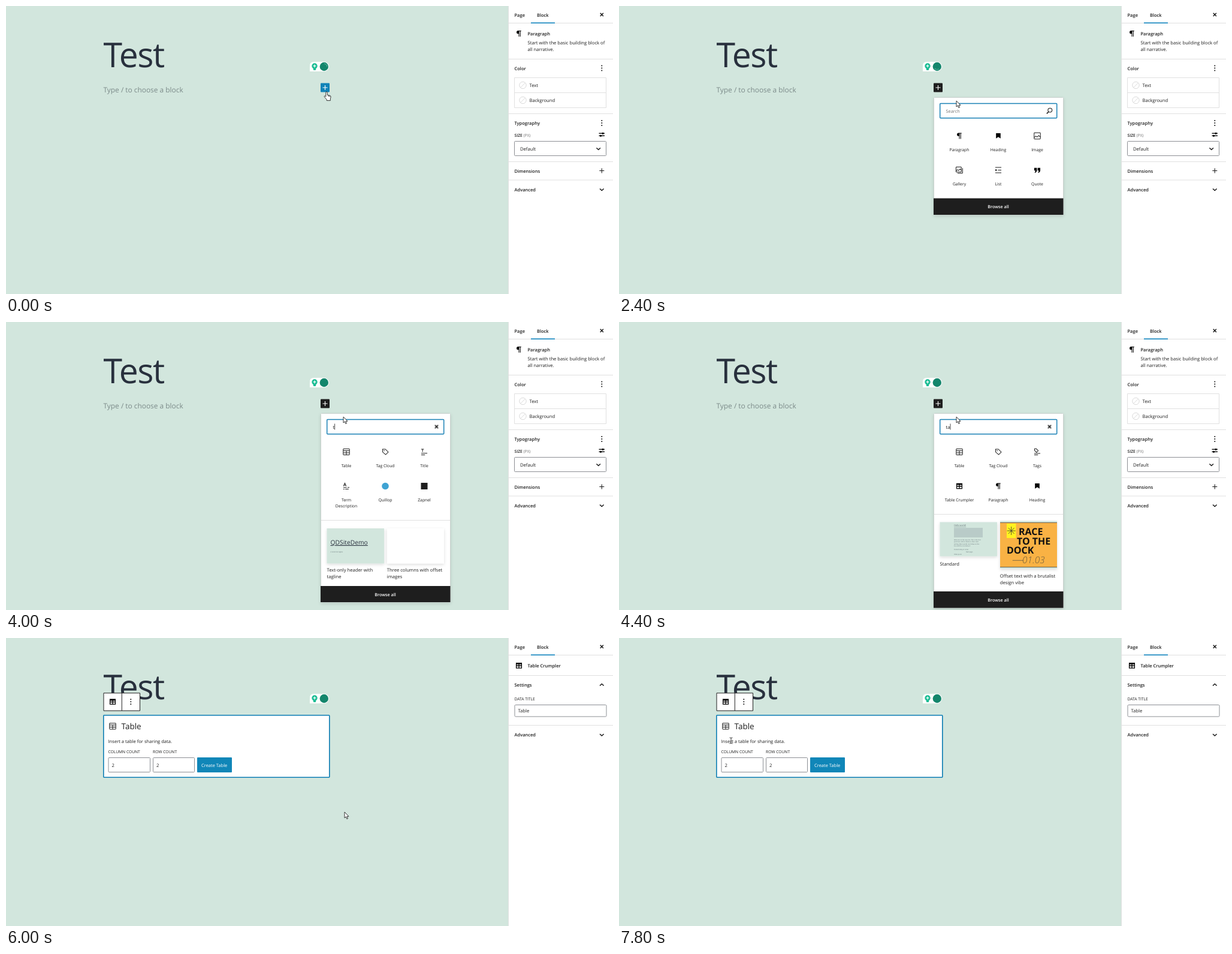
These frames come from a looping animation (1013x480 px, 8 s). An HTML page:

```html
<!DOCTYPE html>
<html lang="en">
<head>
<meta charset="utf-8">
<title>Block editor</title>
<style>
html, body { margin: 0; width: 100%; height: 100%; overflow: hidden; background: #d2e6dd; }
svg { display: block; width: 100%; height: 100%; }
text { font: 7.65px "Open Sans", "Noto Sans", sans-serif; fill: #1e1e1e; text-rendering: geometricPrecision; white-space: pre; }
.b { font-weight: 600; font-size: 7.5px; }
.cap { font-size: 6.7px; }
.lab text { font-size: 6.8px; text-anchor: middle; }
.cta { font-weight: 600; font-size: 7.2px; fill: #fff; text-anchor: middle; }
.soft { fill: #757575; }
.tiny text { font-size: 2.4px; fill: #56636a; }
.poster text { font-weight: 700; font-size: 16px; fill: #111; }
.ln { fill: none; stroke: #1e1e1e; stroke-width: 1.6; }
.rule { fill: none; stroke: #e0e0e0; }
.field { fill: #fff; stroke: #8c8f94; }

/* Hard cuts on an 8 s loop */
.a { animation: 8s step-end infinite; }
.base { animation-name: base; }
.card, .typed, .pop, .s0, .s1, .s2, .hot, .caret0, .caret2, .arrow, .beam { opacity: 0; }
.card { animation-name: card; }
.pop { animation-name: pop; }
.s0 { animation-name: s0; }
.s1 { animation-name: s1; }
.s2 { animation-name: s2; }
.typed { animation-name: typed; }
.hot { animation-name: hot; }
.tint { animation-name: tint; }
.caret0 { animation-name: caret0; }
.caret2 { animation-name: caret2; }
.add { animation-name: add; transform-origin: 532.5px 136px; }
.addbg { animation-name: addbg; }
.busy { animation-name: busy; }
.spin { transform-origin: 530.8px 101px; animation: spin 1s steps(5) infinite; }
.pointer { animation-name: move; }
.hand { animation-name: hand; }
.arrow { animation-name: arrow; }
.beam { animation-name: beam; }

@keyframes base { 0% { opacity: 1 } 75%, 100% { opacity: 0 } }
@keyframes card { 0% { opacity: 0 } 75%, 100% { opacity: 1 } }
@keyframes pop { 0% { opacity: 0 } 22.5% { opacity: 1 } 75%, 100% { opacity: 0 } }
@keyframes s0 { 0% { opacity: 0 } 22.5% { opacity: 1 } 47.5%, 100% { opacity: 0 } }
@keyframes s1 { 0% { opacity: 0 } 47.5% { opacity: 1 } 55%, 100% { opacity: 0 } }
@keyframes s2 { 0% { opacity: 0 } 55% { opacity: 1 } 75%, 100% { opacity: 0 } }
@keyframes typed { 0% { opacity: 0 } 47.5%, 100% { opacity: 1 } }
@keyframes hot { 0% { opacity: 0 } 67.5%, 100% { opacity: 1 } }
@keyframes tint { 0% { fill: #1e1e1e } 67.5%, 100% { fill: #007cba } }
@keyframes caret0 { 0%, 27.5%, 37.5% { opacity: 0 } 22.5%, 32.5%, 42.5% { opacity: 1 } 47.5%, 100% { opacity: 0 } }
@keyframes caret2 { 0% { opacity: 0 } 55% { opacity: 1 } 60%, 100% { opacity: 0 } }
@keyframes add { 0% { transform: scale(1) } 2.5% { transform: scale(1.18) } 25%, 100% { transform: scale(1) } }
@keyframes addbg { 0% { fill: #1083b8 } 25%, 100% { fill: #1e1e1e } }
@keyframes busy { 0% { opacity: 1 } 47.5%, 100% { opacity: 0 } }
@keyframes spin { to { transform: rotate(360deg) } }
@keyframes hand { 0% { opacity: 1 } 25% { opacity: 0 } 65% { opacity: 1 } 75%, 100% { opacity: 0 } }
@keyframes arrow { 0% { opacity: 0 } 25% { opacity: 1 } 65% { opacity: 0 } 75% { opacity: 1 } 87.5%, 100% { opacity: 0 } }
@keyframes beam { 0% { opacity: 0 } 87.5%, 100% { opacity: 1 } }
@keyframes move {
  0% { transform: translate(535px, 143px) }
  2.5% { transform: translate(534px, 142px) }
  5% { transform: translate(531px, 140px) }
  25% { transform: translate(545px, 149px) }
  27.5% { transform: translate(563px, 158px) }
  62.5% { transform: translate(564px, 200px) }
  65% { transform: translate(565px, 256px) }
  67.5% { transform: translate(565px, 290px) }
  80% { transform: translate(352px, 257px) }
  82.5% { transform: translate(318px, 244px) }
  85% { transform: translate(280px, 226px) }
  87.5% { transform: translate(243px, 206px) }
  90% { transform: translate(208px, 188px) }
  92.5% { transform: translate(183px, 173px) }
  95% { transform: translate(185px, 172px) }
  97.5%, 100% { transform: translate(187px, 171px) }
}
</style>
</head>
<body>
<svg viewBox="0 0 1013 480">
<defs>
  <!-- Icons: 24-unit grid, centred on their origin -->
  <g id="para" transform="scale(.63) translate(-12 -12)"><path d="M10 4a4 4 0 0 0 0 8.5h1.2V20h1.6V5.6h2V20h1.6V5.6H18V4z"/></g>
  <g id="mark" transform="scale(.63) translate(-12 -12)"><path d="M6 5v13.8l6-4 6 4V5z"/></g>
  <g id="pic" transform="scale(.63) translate(-12 -12)" class="ln"><rect x="3.7" y="3.7" width="16.6" height="16.6" rx="1.5"/><path d="M4 16l4-3.5 3.5 2.5L16 11l4 4"/></g>
  <g id="gal" transform="scale(.63) translate(-12 -12)" class="ln"><rect x="3.2" y="3.7" width="14" height="13.6" rx="1.5"/><path d="M3.5 14l3.5-3 3 2 4-4 3 3M20.5 7v12q0 1.5-1.5 1.5H7"/></g>
  <g id="list" transform="scale(.63) translate(-12 -12)"><path class="ln" d="M4 4.8h16M11 12h9M4 19.2h16"/><circle cx="6" cy="12" r="2"/></g>
  <g id="quote" transform="scale(.63) translate(-12 -12)"><path id="q" d="M4 6h7v7q0 4-4 6H5q2-3 2-6H4z"/><use href="#q" x="9"/></g>
  <g id="table" transform="scale(.63) translate(-12 -12)" class="ln"><rect x="3.7" y="4.2" width="16.6" height="15.6" rx="1.3"/><path d="M4 9h16M4 14.4h16M12 9v11"/></g>
  <g id="grid" transform="scale(.63) translate(-12 -12)"><path fill-rule="evenodd" d="M4 4.5h16v15H4zM6 9v2.4h5V9zM13 9v2.4h5V9zM6 13.4v4h5v-4zM13 13.4v4h5v-4z"/></g>
  <g id="tag" transform="scale(.63) translate(-12 -12)"><path class="ln" d="M4.8 4.8h7.4l7.6 7.6-6.8 7L4.8 12z"/><circle cx="8.8" cy="8.8" r="1.2"/></g>
  <g id="lead" transform="scale(.63) translate(-12 -12)"><path class="ln" d="M4 5h7M7.5 5v7M4 15.6h16M4 20h10" stroke-width="2"/></g>
  <g id="term" transform="scale(.63) translate(-12 -12)"><path class="ln" d="M4.5 12L8 4l3.5 8M5.8 9.6h4.4M4 15.6h9M15 15.6h5M4 20h3M9 20h9"/></g>
  <g id="tags" transform="scale(.63) translate(-12 -12)"><path class="ln" d="M5 3.8h4.6l5 5-4.3 4.4L5 8.4zM4 16h16M4 20h10"/></g>
  <g id="dots"><circle cy="-4" r=".95"/><circle r=".95"/><circle cy="4" r=".95"/></g>
  <path id="down" class="ln" d="M-3.3-1.5L0 1.5 3.3-1.5" stroke-width="1.1"/>
  <path id="up" class="ln" d="M-3.3 1.5L0-1.5 3.3 1.5" stroke-width="1.1"/>
  <path id="cross" class="ln" d="M-2.6-2.6L2.6 2.6M2.6-2.6L-2.6 2.6" stroke-width="1.1"/>
  <path id="plus" d="M-4 0H4M0-4V4"/>
  <g id="swatch" fill="none" stroke="#d8d8d8"><circle r="5.7"/><path d="M-4 4L4-4"/></g>
  <filter id="lift" x="-10%" y="-10%" width="120%" height="130%"><feDropShadow dx="0" dy="2" stdDeviation="2.5" flood-opacity=".13"/></filter>
</defs>

<rect width="1013" height="480" fill="#d2e6dd"/>
<text x="162.5" y="102" style="font-size:57px;letter-spacing:-1.4px;fill:#28303d">Test</text>

<!-- Writing helper -->
<path d="M507 109V100q0-7 7-7h17a8 8 0 0 1 0 16z" fill="#fff"/>
<g fill="#1bbd94"><circle cx="515" cy="100" r="4.7"/><rect x="512.8" y="103.5" width="4.4" height="3.6" rx="1"/></g>
<path d="M515 97.5v5M512.7 99.8h4.6" stroke="#fff" stroke-width="1.2"/>
<circle cx="530.8" cy="101" r="7.2" fill="#14866c"/>
<g class="a busy"><path class="spin" d="M530.8 96a5 5 0 0 1 5 5" fill="none" stroke="#6fc7ae" stroke-width=".9"/></g>

<!-- Sidebar -->
<rect x="838" width="175" height="480" fill="#fff"/>
<path class="rule" d="M838.5 0V480M838 28.5H1013"/>
<path d="M876 28.2h40" stroke="#007cba" stroke-width="1.6"/>
<text class="b" x="848.5" y="18">Page</text>
<text class="b" x="886" y="18">Block</text>
<use href="#cross" x="994.3" y="14.4"/>

<g class="a base">
  <text x="162.5" y="144" style="font-size:11.9px;fill:#7b8a89">Type / to choose a block</text>
  <g class="a add">
    <rect class="a addbg" x="525" y="128.5" width="15" height="15" rx="1"/>
    <use href="#plus" x="532.5" y="136" stroke="#fff" stroke-width="1.1"/>
  </g>

  <use href="#para" x="856" y="46"/>
  <text class="b" x="870.5" y="48.6">Paragraph</text>
  <text x="870.5" y="64.4">Start with the basic building block of</text>
  <text x="870.5" y="75.4">all narrative.</text>
  <path class="rule" d="M839 88.5h174M839 179.5h174M839 259.5h174M839 290h174M848.5 119.5h153v50h-153zM848.5 144.5h153"/>
  <text class="b" x="848.5" y="106.8">Color</text>
  <use href="#dots" x="994.3" y="103.5"/>
  <use href="#swatch" x="862.5" y="132"/>
  <text x="873.5" y="135">Text</text>
  <use href="#swatch" x="862.5" y="157"/>
  <text x="873.5" y="160">Background</text>
  <text class="b" x="848.5" y="198.4">Typography</text>
  <use href="#dots" x="994.3" y="195"/>
  <text class="cap" x="848.5" y="217.6"><tspan font-weight="600">SIZE</tspan><tspan class="soft"> (PX)</tspan></text>
  <path class="ln" d="M989.5 212.3h9.5M989.5 216.3h9.5" stroke-width="1.1"/>
  <circle cx="996" cy="212.3" r="1.6"/><circle cx="992.5" cy="216.3" r="1.6"/>
  <rect class="field" x="848.5" y="225.5" width="153" height="24" rx="1"/>
  <text x="858" y="240.6">Default</text>
  <use href="#down" x="988.7" y="238"/>
  <text class="b" x="848.5" y="278.2">Dimensions</text>
  <use href="#plus" x="994.3" y="274.5" class="ln" stroke-width="1.1" style="stroke-width:1.1"/>
  <text class="b" x="848.5" y="308.6">Advanced</text>
  <use href="#down" x="994.3" y="306"/>
</g>

<!-- Block picker -->
<g class="a pop">
  <g class="a s0"><rect x="525.5" y="152.5" width="216" height="195.5" rx="1" fill="#fff" stroke="#ccd3d0" filter="url(#lift)"/></g>
  <g class="a s1"><rect x="525.5" y="152.5" width="216" height="314.5" rx="1" fill="#fff" stroke="#ccd3d0" filter="url(#lift)"/></g>
  <g class="a s2"><rect x="525.5" y="152.5" width="216" height="324" rx="1" fill="#fff" stroke="#ccd3d0" filter="url(#lift)"/></g>
  <rect x="535.7" y="162.5" width="195" height="24.3" rx="1" fill="#fff" stroke="#1a81b5" stroke-width="1.5"/>
  <use class="a typed" href="#cross" x="718.5" y="174.5"/>

  <g class="a s0">
    <text class="soft" x="545.5" y="178" style="font-size:7.4px">Search</text>
    <path class="a caret0" d="M545.5 169.5v10" stroke="#1e1e1e" stroke-width=".7"/>
    <path class="ln" d="M717 176.2l-3.2 3.2" stroke-width="1.1"/><circle class="ln" cx="719.3" cy="173.6" r="3.4" stroke-width="1.1" style="stroke-width:1.1"/>
    <use href="#para" x="568" y="216.5"/><use href="#mark" x="633" y="216.5"/><use href="#pic" x="698" y="216.5"/>
    <use href="#gal" x="568" y="273.5"/><use href="#list" x="633" y="273.5"/><use href="#quote" x="698" y="273.5"/>
    <g class="lab">
      <text x="568" y="242">Paragraph</text><text x="633" y="242">Heading</text><text x="698" y="242">Image</text>
      <text x="568" y="299">Gallery</text><text x="633" y="299">List</text><text x="698" y="299">Quote</text>
    </g>
    <rect x="525" y="320.5" width="216.5" height="27.5" fill="#1e1e1e"/>
    <text class="cta" x="633" y="337.2">Browse all</text>
  </g>

  <g class="a s1">
    <text x="545.5" y="178">t</text>
    <path d="M548.6 169.5v10" stroke="#1e1e1e" stroke-width=".8"/>
    <use href="#table" x="568" y="216.5"/><use href="#tag" x="633" y="216.5"/><use href="#lead" x="698" y="216.5"/>
    <use href="#term" x="568" y="273.5"/><circle cx="633" cy="273.5" r="5.8" fill="#3fa3d3"/><rect x="692.5" y="268" width="11" height="11" fill="#1e1e1e"/>
    <g class="lab">
      <text x="568" y="242">Table</text><text x="633" y="242">Tag Cloud</text><text x="698" y="242">Title</text>
      <text x="568" y="299">Term</text><text x="568" y="309">Description</text>
      <text x="633" y="299">Quillop</text><text x="698" y="299">Zapnel</text>
    </g>
    <path class="rule" d="M526 330.5h215"/>
    <g filter="url(#lift)"><rect x="535.5" y="344" width="95.5" height="58.5" fill="#d2e6dd"/><rect x="636" y="344" width="95" height="58.5" fill="#fff"/></g>
    <text x="541.5" y="371" style="font-size:10.3px;fill:#28303d;text-decoration:underline">QDSiteDemo</text>
    <g class="tiny"><text x="541.5" y="383.5">A small site tagline</text></g>
    <text x="535.5" y="416.4">Text-only header with</text><text x="535.5" y="427.4">tagline</text>
    <text x="635.8" y="416.4">Three columns with offset</text><text x="635.8" y="427.4">images</text>
    <rect x="525" y="440" width="216.5" height="27" fill="#1e1e1e"/>
    <text class="cta" x="633" y="456.6">Browse all</text>
  </g>

  <g class="a s2">
    <text x="545.5" y="178">ta</text>
    <path class="a caret2" d="M553 169.5v10" stroke="#1e1e1e" stroke-width=".8"/>
    <rect class="a hot" x="535.5" y="253.5" width="65" height="57" fill="#f5f9fb"/>
    <use href="#table" x="568" y="216.5"/><use href="#tag" x="633" y="216.5"/><use href="#tags" x="698" y="216.5"/>
    <use href="#grid" x="568" y="273.5"/><use href="#para" x="633" y="273.5"/><use href="#mark" x="698" y="273.5"/>
    <g class="lab">
      <text x="568" y="242">Table</text><text x="633" y="242">Tag Cloud</text><text x="698" y="242">Tags</text>
      <text class="a tint" x="568" y="299">Table Crumpler</text><text x="633" y="299">Paragraph</text><text x="698" y="299">Heading</text>
    </g>
    <path class="rule" d="M526 320.5h215"/>
    <g filter="url(#lift)"><rect x="535.5" y="333.5" width="95.5" height="57" fill="#d2e6dd"/><rect x="636" y="331.5" width="95" height="79.5" fill="#d2e6dd"/></g>
    <g class="tiny">
      <text x="559" y="340" style="font-size:3.6px;text-decoration:underline">Hello world!</text>
      <rect x="559" y="343" width="48" height="16" fill="#b9cbc8"/>
      <text x="559" y="363.5">Welcome to the new site. This is the first</text>
      <text x="559" y="367">post here. Edit or delete it, then start</text>
      <text x="559" y="370.5">writing. More words can follow on this</text>
      <text x="559" y="374">line and the one below it</text>
      <text x="559" y="380">Posted today in notes</text><text x="579" y="383.5">Next page</text>
      <text x="559" y="387.5" font-weight="700">Older posts</text>
    </g>
    <text x="535.5" y="406.4">Standard</text>
    <rect x="636" y="334.2" width="95" height="74.4" fill="#f9b244"/>
    <path d="M636 334.4h95M636 408.5h95" stroke="#4d4a42" stroke-width=".8"/>
    <rect x="647" y="336" width="15.5" height="24" fill="#fff21f"/>
    <path d="M654.7 341v14M647.7 348h14M649.8 343.1l9.8 9.8M659.6 343.1l-9.8 9.8" stroke="#333" stroke-width=".8"/>
    <g class="poster">
      <text x="667" y="355">RACE</text><text x="664" y="371">TO THE</text><text x="647" y="386">DOCK</text>
      <text x="673" y="402.2" style="font-weight:300;font-style:italic;font-size:15.5px;fill:#6d5d3c">01.03</text>
    </g>
    <path d="M657 397.3h17" stroke="#4d4a42" stroke-dasharray="1.4 .6"/>
    <text x="635.8" y="425.6">Offset text with a brutalist</text><text x="635.8" y="436.7">design vibe</text>
    <rect x="525" y="449" width="216.5" height="27.5" fill="#1e1e1e"/>
    <text class="cta" x="633" y="465.6">Browse all</text>
  </g>
</g>

<!-- Inserted block -->
<g class="a card">
  <path d="M163 91.8h60.5v29.4H163zM193.3 92v29" fill="#fff" stroke="#1e1e1e"/>
  <use href="#grid" x="178" y="106.3"/><use href="#dots" x="208.3" y="106.3"/>
  <rect x="162.8" y="128.8" width="377" height="103.4" rx="1" fill="#fff" stroke="#0a7cb2" stroke-width="1.6"/>
  <use href="#table" x="178" y="147"/>
  <text x="192.5" y="152.4" style="font-size:13.5px">Table</text>
  <text x="170.5" y="175" style="font-size:7.58px">Insert a table for sharing data.</text>
  <text class="cap" x="170.5" y="192.4">COLUMN COUNT</text>
  <text class="cap" x="245" y="192.4">ROW COUNT</text>
  <rect class="field" x="171" y="199.5" width="69.5" height="24" rx="1"/>
  <rect class="field" x="245.5" y="199.5" width="69" height="24" rx="1"/>
  <text x="176.5" y="214.6">2</text><text x="251" y="214.6">2</text>
  <rect x="319" y="199" width="58" height="25" rx="1" fill="#1086b8"/>
  <text x="326" y="214.6" style="font-size:7.5px;fill:#fff">Create Table</text>

  <use href="#grid" x="856" y="46"/>
  <text class="b" x="870.5" y="48.6">Table Crumpler</text>
  <path class="rule" d="M839 62.5h174M839 145.5h174"/>
  <text class="b" x="848.5" y="81.4">Settings</text>
  <use href="#up" x="994.3" y="78"/>
  <text class="cap" x="848.5" y="103.6">DATA TITLE</text>
  <rect class="field" x="849" y="111.5" width="153" height="19.5" rx="1.5"/>
  <text x="854.5" y="124.4">Table</text>
  <text class="b" x="848.5" y="164.4">Advanced</text>
  <use href="#down" x="994.3" y="161.5"/>
</g>

<!-- Pointer -->
<g class="a pointer" stroke="#222" stroke-width=".9" stroke-linejoin="round">
  <path class="a hand" fill="#fff" d="M-1.2 8V1.2a1.25 1.25 0 0 1 2.5 0V5.4l4 .8q2 .5 1.8 2.4l-.8 3.3V14.6H.2V12.8L-3.6 8.6q-.9-1.4.2-1.7 1-.1 2.2 1.5M3.2 6v2M5.2 6.4v2"/>
  <path class="a arrow" fill="#fff" d="M0 0V10L2.3 7.9 3.9 11.6 5.5 10.9 4 7.3H7z"/>
  <path class="a beam" fill="none" d="M-2.4-5Q0-5 0-3.6 0-5 2.4-5M0-3.6V3.6M-2.4 5Q0 5 0 3.6 0 5 2.4 5"/>
</g>
</svg>
</body>
</html>
```
